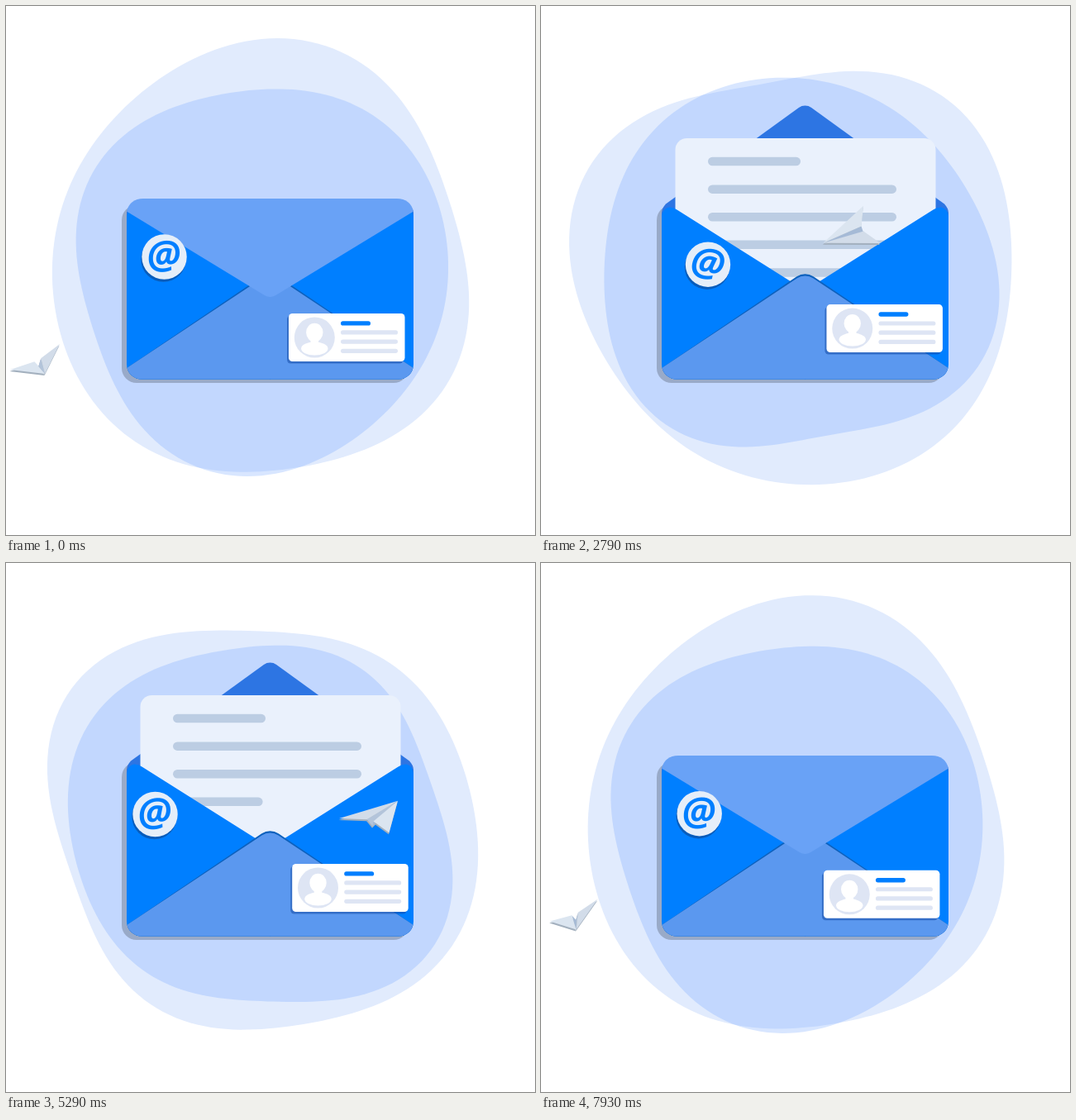
An HTML page with a canvas for the animation above (8000 ms loop, 640 px wide and 640 px high).

```html
<!DOCTYPE html>
<html lang="en">
<head>
<meta charset="utf-8">
<title>Mail</title>
<style>
html, body { margin: 0; width: 100%; height: 100%; overflow: hidden; background: #fff; }
canvas { display: block; width: 640px; height: 640px; }
</style>
</head>
<body>
<canvas id="stage" width="640" height="640"></canvas>
<script>
const c = document.getElementById('stage').getContext('2d');
const LOOP = 8000, HALF = 4000, TAU = Math.PI * 2;
const BLUE = '#007fff', LIGHT = '#69a2f6', FRONT = '#5b98ef', DEEP = '#2d75e3', EDGE = '#0d61bd';
const MID = 319.5, LEFT = 146, RIGHT = 493;

// Key points of the two hovering parts: time, x, y, turn
const BADGE = [
  [0, 191.5, 303.5, -2], [1860, 203.5, 309, 0], [3430, 198, 313, 16],
  [4500, 183.5, 300, 0], [5290, 180.5, 304, -3], [6430, 208.5, 296, 12]
];
const CARD = [
  [0, 342, 372], [1860, 347.7, 365], [3430, 343, 360],
  [4500, 339.5, 367], [5290, 346.2, 364], [6430, 343.3, 360]
];

const wave = (a, mid, cos, sin) => mid + cos * Math.cos(a) + sin * Math.sin(a);
const ramp = (t, a, b) => Math.min(1, Math.max(0, (t - a) / (b - a)));
const ease = u => (1 - Math.cos(Math.PI * u)) / 2;

// Smooth closed path through timed key points
function hover(keys, t) {
  const n = keys.length;
  const key = i => {
    const k = keys[(i + n) % n];
    return [k[0] + LOOP * Math.floor(i / n), ...k.slice(1)];
  };
  let i = n - 1;
  while (keys[i][0] > t) i--;
  const [a, b, d, e] = [-1, 0, 1, 2].map(k => key(i + k));
  const span = d[0] - b[0], u = (t - b[0]) / span, v = 1 - u;
  return b.slice(1).map((p, k) => {
    const q = d[k + 1];
    const m1 = (q - a[k + 1]) / (d[0] - a[0]) * span;
    const m2 = (e[k + 1] - p) / (e[0] - b[0]) * span;
    return v * v * ((1 + 2 * u) * p + u * m1) + u * u * ((1 + 2 * v) * q - v * m2);
  });
}

function box(x, y, w, h, r, color) {
  c.beginPath();
  c.roundRect(x, y, w, h, r);
  c.fillStyle = color;
  c.fill();
}

function oval(x, y, rx, ry, color) {
  c.beginPath();
  c.ellipse(x, y, rx, ry, 0, 0, TAU);
  c.fillStyle = color;
  c.fill();
}

function poly(color, pts) {
  c.beginPath();
  for (const [x, y] of pts) c.lineTo(x, y);
  c.closePath();
  c.fillStyle = color;
  c.fill();
}

// A circle bent by four angular harmonics that swing once per loop
function blob(t, scale, turn, color) {
  const a = TAU * t / LOOP;
  const base = wave(a, 257.6, -.3, 3.5);
  const bends = [
    [wave(a, 1.2, -1.5, .8), wave(a, -2, -6, 3)],
    [wave(a, 3.5, -9, 1.7), wave(a, 3.7, -4.5, -6.3)],
    [wave(a, -2.2, 0, -8), wave(a, -1.6, 11, -2.1)],
    [wave(a, -4.2, 3, 1.8), wave(a, 5, -.3, -1.6)]
  ];
  const pts = [];
  for (let th = 0; th < TAU; th += TAU / 180) {
    const r = scale * bends.reduce((s, b, i) => s + wave((i + 1) * th, 0, ...b), base);
    pts.push([309 + r * Math.cos(th + turn), 319 + r * Math.sin(th + turn)]);
  }
  poly(color, pts);
}

// 1 = flap fully up, -1 = closed
function flapAt(t) {
  return t < 2000 ? -Math.cos(Math.PI * ramp(t, 150, 640))
                  : Math.cos(Math.PI * ramp(t, 3330, 3820));
}

function backFlap(s) {
  const y = 239.5 + 3.5 * (1 - s);
  c.beginPath();
  c.moveTo(LEFT, 262);
  c.lineTo(LEFT, 250);
  c.quadraticCurveTo(LEFT, 245, 151, y);
  c.arcTo(MID, 242.5 - 125 * s, RIGHT - 5, y, 13);
  c.lineTo(RIGHT - 5, y);
  c.quadraticCurveTo(RIGHT, 245, RIGHT, 250);
  c.lineTo(RIGHT, 262);
  c.fillStyle = DEEP;
  c.fill();
}

function frontFlap(s) {
  const top = 243 - 10 * Math.min(1, -3 * s);
  c.beginPath();
  c.moveTo(LEFT, 248.5);
  c.quadraticCurveTo(LEFT + 4, top, LEFT + 20, top);
  c.lineTo(RIGHT - 20, top);
  c.quadraticCurveTo(RIGHT - 4, top, RIGHT, 248.5);
  c.arcTo(MID, 248.5 - 105.5 * s, LEFT, 248.5, 13);
  c.closePath();
  c.fillStyle = LIGHT;
  c.fill();
}

function letter(t) {
  const up = ease(ramp(t, 620, 1020)) - ease(ramp(t, 2880, 3320));
  const top = 236.5 - 76.5 * up;
  box(162.5, top, 315, 430 - top, 14, '#eaf1fc');
  for (let i = 0; i < 5; i++) {
    const w = (i ? 228 : 112) * ramp(t, 700 + 170 * i, 870 + 170 * i);
    if (w > 1) box(202, top + 22.8 + 33.6 * i, w, 10.5, 5.25, '#bccde3');
  }
}

function pocket() {
  c.save();
  c.beginPath();
  c.roundRect(LEFT, 233, RIGHT - LEFT, 218.5, 18);
  c.clip();
  for (const side of [1, -1]) {
    c.save();
    c.translate(MID, 0);
    c.scale(side, 1);
    c.beginPath();
    c.moveTo(-173.5, 452);
    c.lineTo(-173.5, 254);
    c.quadraticCurveTo(-172, 245, -165, 243.5);
    c.quadraticCurveTo(-160, 243, -155, 246.5);
    c.lineTo(-17, 333.5);
    c.lineTo(0.5, 345);
    c.lineTo(0.5, 452);
    c.fillStyle = BLUE;
    c.fill();
    c.restore();
  }
  for (const [y, color] of [[320.5, EDGE], [323, FRONT]]) {
    c.beginPath();
    c.moveTo(LEFT, 438);
    c.arcTo(MID, y, RIGHT, 438, 18);
    c.lineTo(RIGHT, 438);
    c.lineTo(RIGHT, 453);
    c.lineTo(LEFT, 453);
    c.fillStyle = color;
    c.fill();
  }
  c.restore();
}

function badge([x, y, turn]) {
  oval(x - 1, y + 3, 27.2, 27.2, 'rgba(10,84,170,.8)');
  oval(x, y, 27.2, 27.2, '#e5eef9');
  c.save();
  c.translate(x, y);
  c.rotate(turn * Math.PI / 180);
  c.font = 'italic 700 47px "Open Sans", "Noto Sans", sans-serif';
  const m = c.measureText('@');
  c.fillStyle = BLUE;
  c.fillText('@', (m.actualBoundingBoxLeft - m.actualBoundingBoxRight) / 2,
    (m.actualBoundingBoxAscent - m.actualBoundingBoxDescent) / 2);
  c.restore();
}

function card([x, y]) {
  c.save();
  c.translate(x, y);
  box(-2, 2.5, 140.5, 58, 4.5, 'rgba(15,70,160,.5)');
  box(0, 0, 140.5, 58, 4.5, '#fff');
  oval(31.3, 29, 24.5, 24.5, '#dee5f4');
  oval(31.3, 23, 10.2, 11.2, '#fff');
  box(26.5, 28, 9.6, 12, 3, '#fff');
  oval(31.3, 42.5, 16.2, 8, '#fff');
  box(63, 9.2, 36, 5.4, 2.7, BLUE);
  for (let i = 0; i < 3; i++) box(63, 20.3 + 11.2 * i, 69, 5.2, 2.6, '#dee5f4');
  c.restore();
}

// The nose flies a slanted oval while both wing tips swing around it
function plane(t) {
  const a = TAU * t / HALF;
  const nose = [wave(a, 309, -262, 55), wave(a, 331, 114, 8)];
  const wingA = [wave(a, 3, 15, -75), wave(a, -2, -34, 9)];
  const wingB = [wave(a, 0, -42, -50) - 20 * Math.sin(2 * a), wave(a, -3, -2, 45)];
  // Point between the wings: share of each, plus a drop
  const at = (ka, kb, dx = 0, dy = 0) => [
    nose[0] + ka * wingA[0] + kb * wingB[0] + dx,
    nose[1] + ka * wingA[1] + kb * wingB[1] + dy
  ];
  const foldA = at(.48, .32), foldB = at(.35, .45), keel = at(.4, .4, 2, 7);
  const faces = [
    ['#b3c4da', [nose, foldA, keel]], ['#a5bad6', [nose, foldB, keel]],
    ['#d2dce9', [nose, at(1, 0), foldA]], ['#dbe5f0', [nose, at(0, 1), foldB]]
  ];
  c.save();
  c.translate(-.5, 2);
  for (const [, pts] of faces) poly('#a3b0be', pts);
  c.restore();
  for (const [color, pts] of faces) poly(color, pts);
}

function draw(time) {
  const t = time % LOOP, h = t % HALF;
  const flap = flapAt(h);
  c.fillStyle = '#fff';
  c.fillRect(0, 0, 640, 640);
  blob(t, 1, 0, '#e1ebfd');
  blob(t, .893, Math.PI, 'rgba(99,156,253,.25)');
  box(140, 241, 347, 215, 18, 'rgba(0,0,0,.21)');
  backFlap(Math.max(0, flap));
  letter(h);
  pocket();
  if (flap < 0) frontFlap(flap);
  badge(hover(BADGE, t));
  card(hover(CARD, t));
  plane(h);
}

const start = performance.now();
function tick() {
  draw(performance.now() - start);
  requestAnimationFrame(tick);
}
tick();
</script>
</body>
</html>
```
